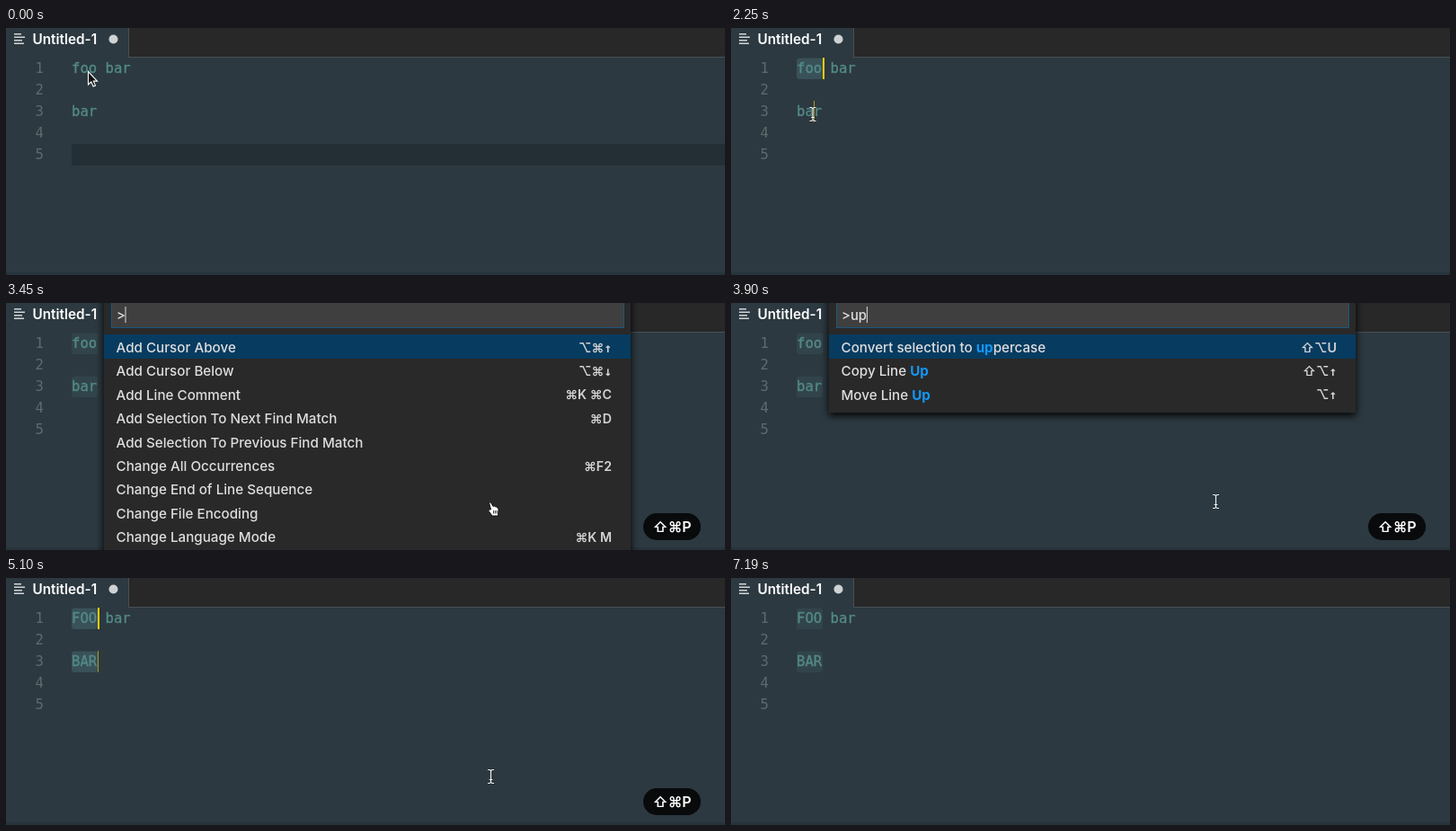
Recreate the animation shown at these times as an HTML page. Size 800 by 275 pixels, loop 7.29 s.

```html
<!DOCTYPE html>
<html lang="en">
<head>
<meta charset="utf-8">
<title>Uppercase command</title>
<style>
html, body { margin: 0; width: 100%; height: 100%; overflow: hidden; background: #2c3940; }
svg { display: block; width: 800px; height: 275px; }
text { white-space: pre; }
.code, .num { font: 15.6px "DejaVu Sans Mono", monospace; }
.code { fill: #538a86; stroke: #538a86; stroke-width: .35; }
.num { fill: #606a6d; text-anchor: end; }
.tab { font: 600 15.3px Inter, sans-serif; fill: #fff; }
.input { font: 500 14.8px Inter, sans-serif; fill: #dedede; }
.item { font: 500 15.2px Inter, sans-serif; fill: #dedede; }
.key { font: 600 14.2px Inter, "DejaVu Sans", sans-serif; fill: #d4d4d4; text-anchor: end; }
.arrow { font-family: "DejaVu Sans Mono", monospace; }
.badge { font: 600 16px Inter, "DejaVu Sans", sans-serif; fill: #fff; text-anchor: middle; }
.match { fill: #1497f5; font-weight: 700; }
.palette { filter: drop-shadow(0 3px 4px #000); }
</style>
</head>
<body>
<svg id="stage" viewBox="0 0 800 275"></svg>
<script>
const LOOP = 7290;
const ROW = 26.4;
const stage = document.getElementById('stage');

const rect = (x, y, w, h, fill, extra = '') =>
  `<rect x="${x}" y="${y}" width="${w}" height="${h}" fill="${fill}" ${extra}/>`;
const text = (cls, x, y, s) => `<text class="${cls}" x="${x}" y="${y}">${s}</text>`;
const lineTop = n => 33 + 24 * (n - 1);

// Last value whose start time has been reached.
const at = (t, steps) => steps.reduce((v, [start, next]) => t >= start ? next : v, null);
const within = (t, ...spans) => spans.some(([a, b]) => t >= a && t < b);

const commands = {
  '': [['Add Cursor Above', '⌥⌘↑'], ['Add Cursor Below', '⌥⌘↓'],
    ['Add Line Comment', '⌘K ⌘C'], ['Add Selection To Next Find Match', '⌘D'],
    ['Add Selection To Previous Find Match'], ['Change All Occurrences', '⌘F2'],
    ['Change End of Line Sequence'], ['Change File Encoding'], ['Change Language Mode', '⌘K M']],
  u: [['Add Cursor Above', '⌥⌘↑'], ['Add Cursor Below', '⌥⌘↓'],
    ['Add Selection To Previous Find Match'], ['Change All Occurrences', '⌘F2'],
    ['Change End of Line Sequence'], ['Change Language Mode', '⌘K M'],
    ['Convert selection to uppercase', '⇧⌥U'], ['Copy Line Up', '⇧⌥↑'], ['Cursor Undo', '⌘U']],
  up: [['Convert selection to uppercase', '⇧⌥U'], ['Copy Line Up', '⇧⌥↑'], ['Move Line Up', '⌥↑']],
  upp: [['Convert selection to uppercase', '⇧⌥U']]
};

const shapes = {
  arrow: '<path d="M0 0V14.5L3.3 11.5L5.6 16.6L8 15.6L5.8 10.6H10Z" fill="#111" stroke="#fff" stroke-width="1.1"/>',
  beam: ['stroke="#1b2428" stroke-width="2.6" opacity=".5"', 'stroke="#f4f4f4" stroke-width="1.2"']
    .map(s => `<path d="M-3.5 -7.5H-1.5L0 -6.5L1.5 -7.5H3.5M0 -6.5V6.5M-3.5 7.5H-1.5L0 6.5L1.5 7.5H3.5M-1.8 3.5H1.8" fill="none" ${s}/>`).join(''),
  hand: '<path d="M-3.5 -6.500Q-2 -8 -1 -6L1 -2.500Q2.500 -4 3.500 -2Q5 -3 5.500 -1Q7.500 -1 7 1L6.500 8H0L-4 2.500Q-4.500 0 -1.500 1Z" fill="#fff" stroke="#111"/>' +
    '<path d="M1.500 2V5.500M3.300 2V5.500M5 2V5.500" stroke="#111" stroke-width=".8"/>'
};

function pointer(t) {
  const p = at(t, [
    [0, ['arrow', 91.5, 48.5]], [750, ['beam', 92, 50]], [1050, ['beam', 91, 52]],
    [1200, ['beam', 92, 51]], [1650, ['beam', 91, 70]], [1800, ['beam', 89, 114]],
    [1950, ['beam', 91, 96]], [2550, ['beam', 230, 140]], [2700, ['beam', 539.5, 221]],
    [3450, ['hand', 541, 229]], [3900, ['beam', 539.5, 221]],
    [6300, ['beam', 542.5, 221]], [6450, null]
  ]);
  return p ? `<g transform="translate(${p[1]} ${p[2]})">${shapes[p[0]]}</g>` : '';
}

function editor(t) {
  const upper = t >= 5100;
  const focused = !within(t, [3450, 5100], [7190, LOOP]);
  const selected = [t >= 900 && 1, t >= 2400 && 3].filter(Boolean);
  const blinkOn = within(t, [750, 1350], [1950, 2850], [5100, 5550], [6150, 6590], [7040, 7190]);
  let s = '';
  if (t < 900) s += rect(73, t < 750 ? 129 : 33, 727, 24, '#232e35');
  for (const n of selected)
    s += rect(73, lineTop(n) + .5, 29, 23.5, focused ? '#395159' : '#32444b', 'rx="3"');
  for (let n = 1; n <= 5; n++) s += text('num', 42, lineTop(n) + 17, n);
  s += text('code', 73, 50, upper ? 'FOO bar' : 'foo bar') + text('code', 73, 98, upper ? 'BAR' : 'bar');
  if (within(t, [600, 750])) s += rect(73, 129, 2, 24, '#ffcc00');
  if (blinkOn) {
    s += rect(t < 900 ? 91 : 102, 33, 2, 24, '#ffcc00');
    if (t >= 2250) s += rect(t < 2400 ? 92 : 102, 81, 1, 24, '#b59a18');
  }
  return s;
}

function chrome() {
  const icon = [8, 12, 9, 11].map((w, i) => rect(9, 6 + i * 3.5, w, 1.5, '#d2d6d8')).join('');
  return rect(136, 0, 664, 33, '#485156') + rect(137, 0, 663, 32, '#282828') + icon +
    text('tab', 29.5, 18, 'Untitled-1') + '<circle cx="119.500" cy="12.500" r="5" fill="#cfd2d3"/>' +
    rect(0, 272, 800, 3, '#27333a');
}

function palette(t) {
  if (!within(t, [3450, 5100])) return '';
  const query = at(t, [[3450, ''], [3750, 'u'], [3900, 'up'], [4050, 'upp']]);
  const rows = commands[query];
  const mark = label => query
    ? label.replace(new RegExp(query, 'i'), '<tspan class="match">$&</tspan>') : label;
  const keys = key => key.replace(/[↑↓]/, '<tspan class="arrow">$&</tspan>');
  let s = rect(109, -10, 586, 53 + rows.length * ROW, '#292929', 'class="palette"') +
    rect(117.5, -5, 570, 32.5, '#3f3f3f', 'stroke="#1b587c"') +
    text('input', 123, 18.5, '&gt;' + query) +
    rect(132.5 + query.length * 9.2, 4, 1, 18, '#ddd') + rect(109, 35, 586, 27, '#073b60');
  rows.forEach(([label, key = ''], i) => {
    const y = 55 + i * ROW;
    s += text('item', 122.5, y, mark(label)) + text('key', 674, y - .5, keys(key));
  });
  return s;
}

function badge(t) {
  const opacity = at(t, [[0, 0], [3300, 1], [5400, .4], [5550, 0]]);
  return opacity ? `<g opacity="${opacity}">` + rect(709, 234, 64, 30, '#090a0b', 'rx="15"') +
    text('badge', 741, 255, '⇧⌘P') + '</g>' : '';
}

let shown = '';
function draw(now) {
  const t = now % LOOP;
  const scene = rect(0, 0, 800, 275, '#2c3940') + editor(t) + chrome() + palette(t) + badge(t) + pointer(t);
  if (scene !== shown) stage.innerHTML = shown = scene;
  requestAnimationFrame(() => draw(performance.now() - start));
}
const start = performance.now();
draw(0);
</script>
</body>
</html>
```
